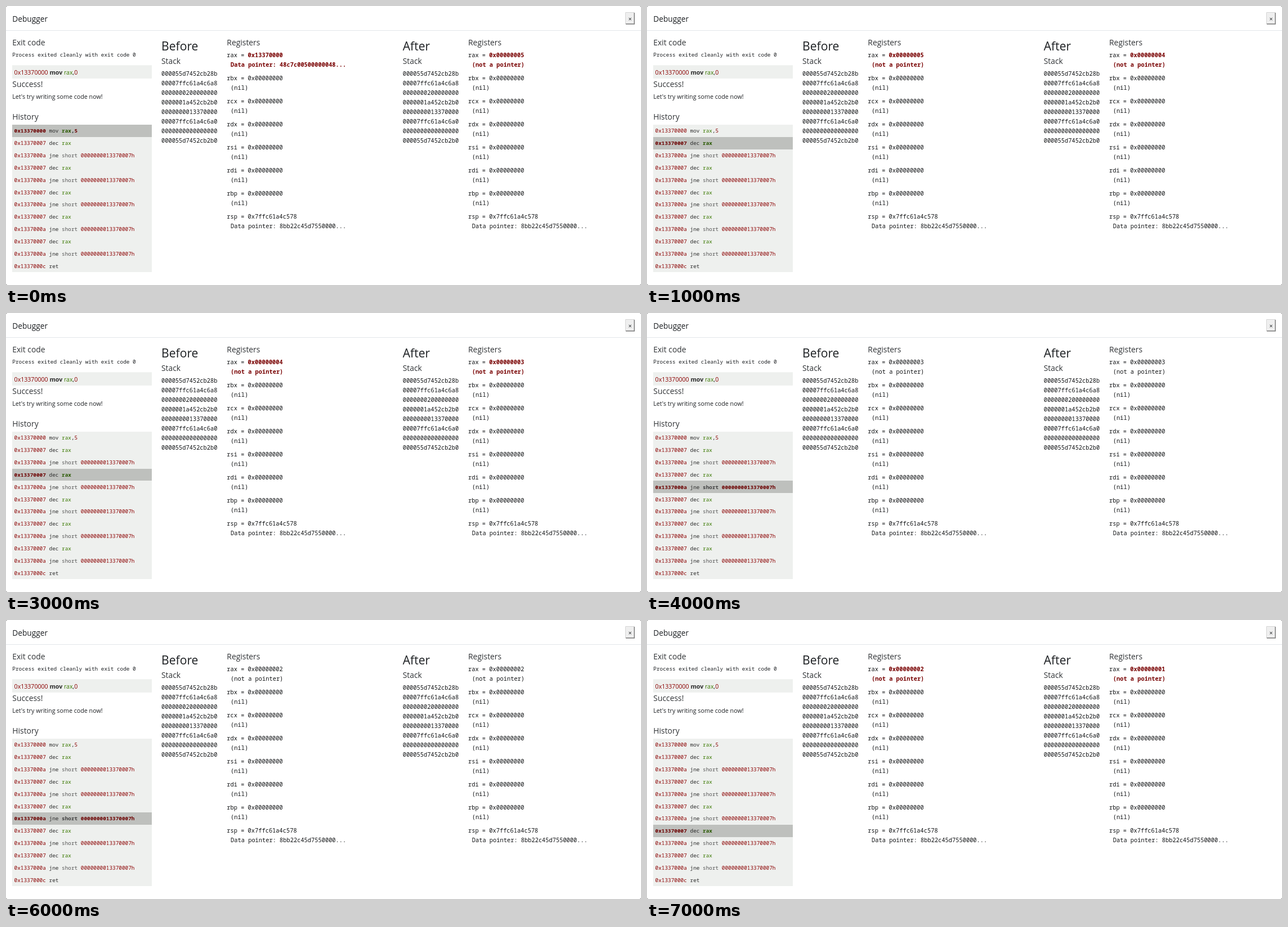
Recreate the animation shown at these times as an HTML page. Size 1128 by 496 pixels, loop 8000 ms.

```html
<!DOCTYPE html>
<html lang="en">
<head>
<meta charset="utf-8">
<title>Debugger</title>
<style>
html, body { margin: 0; width: 100%; height: 100%; overflow: hidden; background: #858585; }
svg { display: block; width: 1128px; height: 496px; }
text { white-space: pre; fill: #1c1f22; font-family: "Open Sans", "Noto Sans", sans-serif; }
.title { font-size: 13.7px; }
.head { font-size: 13.9px; fill: #303336; }
.big { font-size: 21.1px; }
.note { font-size: 10.73px; }
.code { font-size: 10.6px; }
.mono, .small { font-family: "Noto Sans Mono", "DejaVu Sans Mono", monospace; }
.mono { font-size: 10.36px; fill: #121416; }
.small { font-size: 9.4px; }
.addr, .num { fill: #8b0000; }
.op { fill: #2b2b2b; font-weight: 500; }
.code .op { font-weight: 700; }
.reg { fill: #3a7800; }
.word { fill: #555; }
.changed { fill: #780000; font-weight: 700; }
.on { font-weight: 600; }
.on .addr, .on .num { fill: #6c0000; }
.on .reg { fill: #285800; }
.on .word { fill: #404040; }
</style>
</head>
<body>
<svg viewBox="0 0 1128 496">
  <rect width="1128" height="496" rx="3" fill="#fff"/>
  <path d="M0 43.5H1128" stroke="#e3e6e9"/>
  <rect x="1101" y="12" width="15" height="20" fill="#efefef"/>
  <path d="M1100.5 32V11.5H1116" fill="none" stroke="#d4d4d4"/>
  <path d="M1101 32H1116.2V12" fill="none" stroke="#777" stroke-width="1.4"/>
  <text x="1108.5" y="27" class="note" text-anchor="middle">×</text>
  <rect x="11" y="105.3" width="248" height="23.6" fill="#eef0ee"/>
  <g id="labels"></g>
  <g id="state"></g>
</svg>
<script>
const STEP = 1000, STEPS = 8;
const ROW_TOP = 211, ROW_H = 21.85;
const COLUMNS = [["Before", 276], ["After", 704.7]];
const REGISTERS = ["rax", "rbx", "rcx", "rdx", "rsi", "rdi", "rbp", "rsp"];
const STACK = ["000055d7452cb28b", "00007ffc61a4c6a8", "0000000200000000", "0000001a452cb2b0",
  "0000000013370000", "00007ffc61a4c6a0", "0000000000000000", "000055d7452cb2b0"];

const text = (x, y, cls, s) => `<text x="${x}" y="${y}" class="${cls}">${s}</text>`;
const span = (cls, s) => `<tspan class="${cls}">${s}</tspan>`;
const line = (addr, op, rest = "") => `${span("addr", "0x" + addr)} ${span("op", op)} ${rest}`;
const mov = n => line("13370000", "mov", span("reg", "rax") + "," + span("num", n));

const dec = line("13370007", "dec", span("reg", "rax"));
const jne = line("1337000a", "jne", span("word", "short") + " " + span("num", "0000000013370007h"));
const rows = [mov(5)];
for (let i = 0; i < 5; i++) rows.push(dec, jne);
rows.push(line("1337000c", "ret"));

function register(x, i, value, note, cls = "") {
  const y = 91.2 + i * 40.93;
  return text(x, y, "mono", `${REGISTERS[i]} = ${span(cls, value)}`) +
    text(x + 6.8, y + 17, "mono", span(cls, note));
}

function labels() {
  let out = text(11.3, 28.4, "title", "Debugger") +
    text(11.3, 70.4, "head", "Exit code") +
    text(11.3, 90, "small", "Process exited cleanly with exit code 0") +
    text(14.6, 121.6, "code", mov(0)) +
    text(11.3, 144, "head", "Success!") +
    text(11.3, 165, "note", "Let's try writing some code now!") +
    text(11.3, 202.3, "head", "History");
  for (const [name, x] of COLUMNS) {
    out += text(x, 79, "big", name) + text(x, 102.7, "head", "Stack") +
      text(x + 116.3, 70.4, "head", "Registers");
    STACK.forEach((s, i) => out += text(x, 124.2 + i * 16.93, "mono", s));
    for (let i = 1; i < 7; i++) out += register(x + 116.3, i, "0x00000000", "(nil)");
    out += register(x + 116.3, 7, "0x7ffc61a4c578", "Data pointer: 8bb22c45d7550000...");
  }
  return out;
}

// rax after the given step: 5, then one less on every dec (odd steps)
const raxAfter = step => 5 - Math.ceil(step / 2);

function state(step) {
  let out = "";
  rows.forEach((row, i) => {
    const on = i === step, hover = step === 2 && i === 3;
    const y = ROW_TOP + i * ROW_H, fill = on ? "#bec0bd" : hover ? "#e2e4e1" : "#eef0ee";
    out += `<rect x="11" y="${y}" width="248" height="${ROW_H}" fill="${fill}" shape-rendering="crispEdges"/>` +
      text(14.6, y + 14.3, on ? "small on" : "small", row);
  });
  const cls = step === 0 || step % 2 ? "changed" : "";
  COLUMNS.forEach(([, x], after) => {
    const first = !after && step === 0;
    const value = first ? "0x13370000" : "0x0000000" + raxAfter(after ? step : step - 1);
    const note = first ? "Data pointer: 48c7c00500000048..." : "(not a pointer)";
    out += register(x + 116.3, 0, value, note, cls);
  });
  return out;
}

const get = id => document.getElementById(id);
get("labels").innerHTML = labels();
let shown = -1;
function draw() {
  const step = Math.floor(performance.now() / STEP) % STEPS;
  if (step !== shown) get("state").innerHTML = state(shown = step);
  requestAnimationFrame(draw);
}
draw();
</script>
</body>
</html>
```
